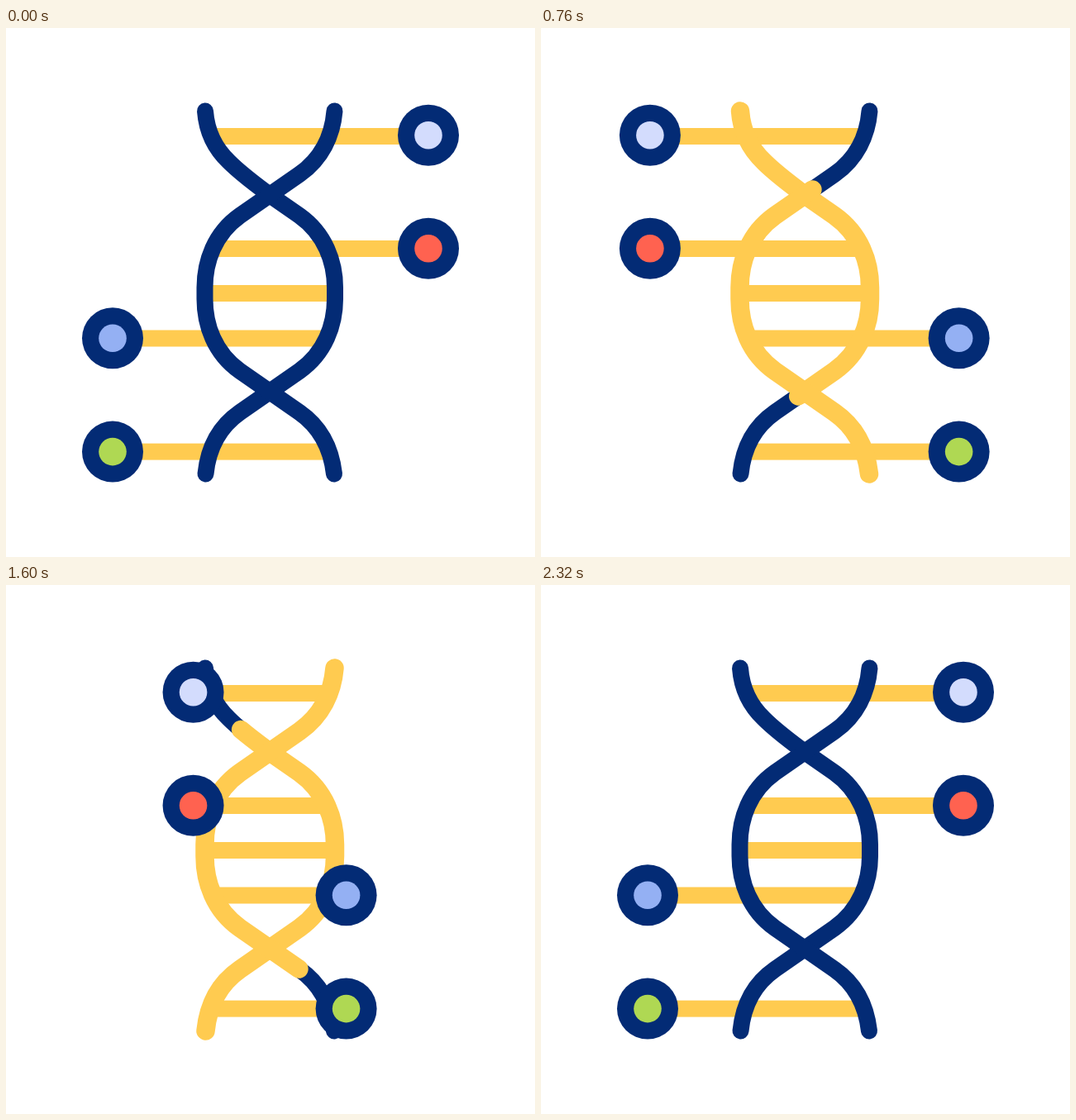
An HTML page with a canvas that plays this animation: 640 by 640 pixels, repeating every 2400 ms.

```html
<!DOCTYPE html>
<html lang="en">
<head>
<meta charset="utf-8">
<title>DNA helix</title>
<style>
  html, body { margin: 0; width: 100%; height: 100%; overflow: hidden; background: #fff; }
  canvas { display: block; width: 640px; height: 640px; }
</style>
</head>
<body>
<canvas id="stage" width="640" height="640"></canvas>
<script>
const ctx = document.getElementById('stage').getContext('2d');
const NAVY = '#032b75', YELLOW = '#ffcb50';
const LOOP = 2400, HALF = LOOP / 2, STEP = 40;
const START = 200, SLIDE = 600, SWEEP = 800;

// Each strand runs in the direction its colour spreads.
const strands = [
  'M241 100.5 C243 127 253 146 270 162 C285 177 303 190 319 202 L355 227 ' +
  'C386 249 398 283 398 314 L398 328 C398 359 386 393 355 415 L283 465 ' +
  'C260 481 245 505 241.5 539.5',
  'M397 539.5 C393 505 378 481 355 465 L283 415 ' +
  'C252 393 240.5 359 240.5 328 L240.5 314 C240.5 283 252 249 283 227 ' +
  'L355 177 C382 158 395 130 397.5 100.5'
].map(d => {
  const el = document.createElementNS('http://www.w3.org/2000/svg', 'path');
  el.setAttribute('d', d);
  return { path: new Path2D(d), len: el.getTotalLength() };
});

const rungs = [
  { y: 131, cy: 129.7, from: 511, to: 127, fill: '#d3dcfd' },
  { y: 267, cy: 266.8, from: 511, to: 127, fill: '#ff6250' },
  { y: 375.5, cy: 375.3, from: 129, to: 510.5, fill: '#94b0f3' },
  { y: 512.6, cy: 512.6, from: 129, to: 510.5, fill: '#afd853' }
];

const smooth = u => {
  u = Math.min(1, Math.max(0, u));
  return u * u * (3 - 2 * u);
};

function bar(x1, x2, y) {
  ctx.fillStyle = YELLOW;
  ctx.fillRect(x1, y - 10, x2 - x1, 20);
}

function disc(x, y, r, fill) {
  ctx.fillStyle = fill;
  ctx.beginPath();
  ctx.arc(x, y, r, 0, Math.PI * 2);
  ctx.fill();
}

// Strokes the part of a strand between fractions a and b.
function strand({ path, len }, color, width, a, b) {
  if (b <= a) return;
  ctx.strokeStyle = color;
  ctx.lineWidth = width;
  ctx.setLineDash(b - a < 1 ? [len * (b - a), len * 2] : []);
  ctx.lineDashOffset = -a * len;
  ctx.stroke(path);
}

function draw(ms) {
  const t = Math.floor(ms % LOOP / STEP) * STEP;
  const back = t >= HALF;
  const local = t % HALF - START;
  const slide = smooth(local / SLIDE);
  const sweep = smooth(local / SWEEP);
  const pos = back ? 1 - slide : slide;

  ctx.fillStyle = '#fff';
  ctx.fillRect(0, 0, 640, 640);
  ctx.lineCap = ctx.lineJoin = 'round';

  const xs = rungs.map(r => r.from + (r.to - r.from) * pos);
  bar(245, 393, 321);
  rungs.forEach((r, i) => bar(Math.min(250, xs[i]), Math.max(388, xs[i]), r.y));

  strands.forEach(s => strand(s, NAVY, 20, 0, 1));
  strands.forEach(s => strand(s, YELLOW, 22.5, back ? sweep : 0, back ? 1 : sweep));

  rungs.forEach((r, i) => {
    disc(xs[i], r.cy, 37, NAVY);
    disc(xs[i], r.cy, 16.8, r.fill);
  });
}

const t0 = performance.now();
function tick() {
  draw(performance.now() - t0);
  requestAnimationFrame(tick);
}
tick();
</script>
</body>
</html>
```
